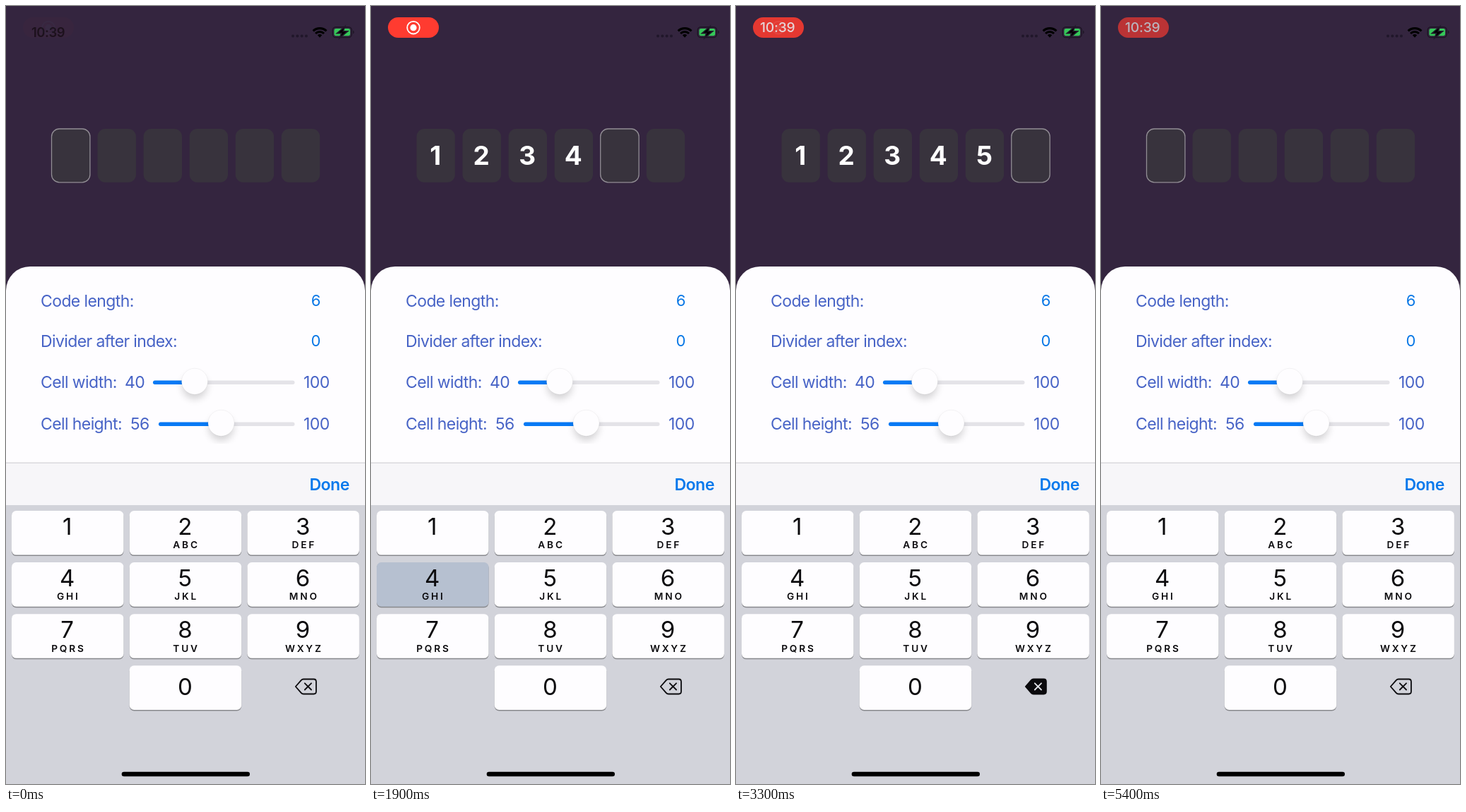
Animation of 508 by 1102 pixels, one loop 5.5 s. Source, as an HTML page:

```html
<!DOCTYPE html>
<html lang="en">
<head>
<meta charset="utf-8">
<title>Code entry</title>
<style>
html, body { margin: 0; width: 100%; height: 100%; overflow: hidden; background: #34253f; }
svg { display: block; width: 100%; height: 100%; }
text { font-family: Inter, "Liberation Sans", sans-serif; font-optical-sizing: none; }
.label { font-size: 23px; letter-spacing: -.6px; fill: #4763c6; }
.value { font-size: 22px; fill: #0a78e6; text-anchor: middle; }
.done { font-size: 23px; font-weight: 600; letter-spacing: -.5px; fill: #0879ec; }
.cell { fill: #38333d; }
.code { font-size: 37px; font-weight: 700; fill: #fff; text-anchor: middle; }
.num { font-size: 33px; fill: #0b0a0d; text-anchor: middle; }
.abc { font-size: 13.7px; font-weight: 600; letter-spacing: 2.8px; fill: #0b0a0d; text-anchor: middle; }
</style>
</head>
<body>
<svg id="stage" viewBox="0 0 508 1102">
  <defs>
    <filter id="soft" x="-60%" y="-60%" width="220%" height="240%"><feGaussianBlur stdDeviation="5.5"/></filter>
    <clipPath id="panelClip"><rect x="0" y="369" width="508" height="251"/></clipPath>
  </defs>
  <rect width="508" height="1102" fill="#34253f"/>

  <text id="clock" x="36" y="44" font-size="18.5" font-weight="600" letter-spacing="-.5">10:39</text>
  <g id="pill">
    <rect x="24" y="16" width="72" height="29" rx="14.5" fill="#ff3b30"/>
    <g id="record">
      <circle cx="60" cy="30.7" r="8.8" fill="none" stroke="#fff" stroke-width="1.8"/>
      <circle cx="60" cy="30.7" r="4.6" fill="#fff"/>
    </g>
    <text id="pillTime" x="34" y="37" font-size="19.3" font-weight="500" letter-spacing="-.2" fill="#fff">10:39</text>
  </g>

  <g fill="#20172a">
    <circle cx="406" cy="42.5" r="2"/><circle cx="412.3" cy="42.5" r="2"/>
    <circle cx="418.6" cy="42.5" r="2"/><circle cx="424.9" cy="42.5" r="2"/>
  </g>
  <g fill="none" stroke="#000" stroke-width="3.1">
    <path d="M434.6 35.4a13.6 13.6 0 0 1 18.8 0"/>
    <path d="M438 39a8.6 8.6 0 0 1 12 0"/>
    <path d="M440.8 41.2L444 44.8L447.2 41.2A4.6 4.6 0 0 0 440.8 41.2Z" fill="#000" stroke="none"/>
  </g>
  <rect x="462.2" y="29.7" width="27" height="14.8" rx="4.6" fill="none" stroke="#1d1524" stroke-width="1.4"/>
  <path d="M491 34.6v5a2.8 2.8 0 0 0 0-5z" fill="#1d1524"/>
  <rect x="464.4" y="31.9" width="22.6" height="10.4" rx="2.7" fill="#35c759"/>
  <path d="M479.6 29L468.2 38.6H474.6L472 45.4L483.6 35.8H477.2Z" fill="#000" stroke="#21182a" stroke-width="1.6"/>

  <g id="cells"></g>

  <path d="M0 647V403A34 34 0 0 1 34 369H474A34 34 0 0 1 508 403V647Z" fill="#fefdff"/>
  <text class="label" x="49" y="425.5">Code length:</text>
  <text class="label" x="49" y="482.5">Divider after index:</text>
  <text class="label" x="49" y="541">Cell width:</text>
  <text class="label" x="49" y="600">Cell height:</text>
  <text class="value" x="438.5" y="425">6</text>
  <text class="value" x="438.5" y="482">0</text>
  <g id="sliders"></g>

  <rect y="647" width="508" height="60" fill="#f7f6f9"/>
  <rect y="646.5" width="508" height="1.2" fill="#d3d2d6"/>
  <text class="done" x="429.5" y="685.7">Done</text>

  <rect y="707" width="508" height="395" fill="#d2d3da"/>
  <g id="keys"></g>
  <g stroke-linejoin="round" stroke-linecap="round" stroke-width="1.8">
    <path id="eraser" d="M409.8 964L417.6 955.1Q419 953.5 421 953.5H435.5Q438.9 953.5 438.9 956.9V971.1Q438.9 974.5 435.5 974.5H421Q419 974.5 417.6 972.9Z" stroke="#0b0a0d"/>
    <path id="cross" d="M422.8 959.3l9.2 9.2M432 959.3l-9.2 9.2" fill="none"/>
  </g>
  <rect x="163.7" y="1084.7" width="181.3" height="6.6" rx="3.3" fill="#000"/>
</svg>
<script>
const LOOP = 5500, STEP = 100;
const $ = id => document.getElementById(id);

// key, touch down, highlight end, digit shown
const taps = [
  [1, 1000, 1300, 1100],
  [2, 1300, 1500, 1400],
  [3, 1600, 1800, 1700],
  [4, 1800, 2000, 1900],
  [5, 2000, 2200, 2100],
  [6, 2400, 2600, 2500]
];
const erases = [3200, 3550, 3900, 4150, 4400, 4650];
const HOLD = 140;

// pill brightness over one pulse
const PULSE = 2200;
const pulse = [[0, 1], [300, .92], [800, .52], [1000, .66], [1100, .87], [1350, .96], [1600, .99], [1800, 1], [2200, 1]];

function add(parent, tag, attrs, text) {
  const el = document.createElementNS("http://www.w3.org/2000/svg", tag);
  for (const k in attrs) el.setAttribute(k, attrs[k]);
  if (text !== undefined) el.textContent = text;
  parent.append(el);
  return el;
}

function ramp(t, from, to) {
  return Math.min(1, Math.max(0, (t - from) / (to - from)));
}

function sample(table, t) {
  const i = table.findIndex(p => p[0] > t);
  if (i < 0) return table[table.length - 1][1];
  const [t0, a] = table[i - 1], [t1, b] = table[i];
  return a + (b - a) * ramp(t, t0, t1);
}

const cells = Array.from({ length: 6 }, (_, i) => {
  const x = 64.5 + i * 65.05;
  return {
    box: add($("cells"), "rect", { class: "cell", x, y: 174, width: 54.4, height: 75.8, rx: 11 }),
    digit: add($("cells"), "text", { class: "code", x: x + 26.7, y: 225 }, i + 1)
  };
});

function slider(value, textX, left, knob, y) {
  const g = add($("sliders"), "g", { "clip-path": "url(#panelClip)" });
  add(g, "text", { class: "label", x: textX, y: y + 8 }, value);
  add(g, "text", { class: "label", x: 421, y: y + 8 }, 100);
  add(g, "rect", { x: left, y: y - 2.5, width: 408.5 - left, height: 5.4, rx: 2.7, fill: "#e4e3e8" });
  add(g, "rect", { x: left, y: y - 2.5, width: knob - left, height: 5.4, rx: 2.7, fill: "#087af5" });
  add(g, "circle", { cx: knob, cy: y + 6, r: 17.5, fill: "#000", opacity: .17, filter: "url(#soft)" });
  add(g, "circle", { cx: knob, cy: y - 1.3, r: 18.5, fill: "#fefdff", stroke: "#000", "stroke-opacity": .06, "stroke-width": .8 });
}
slider(40, 168, 208, 267, 533);
slider(56, 176, 216, 304.5, 592);

const letters = ["", "ABC", "DEF", "GHI", "JKL", "MNO", "PQRS", "TUV", "WXYZ"];

function key(n, col, row) {
  const x = 8 + col * 166.7, y = 715 + row * 73.1, mid = x + 79.2;
  const size = { x, width: 158.5, height: 62.6, rx: 6.5 };
  add($("keys"), "rect", { ...size, y: y + 1.5, fill: "#88898d" });
  const cap = add($("keys"), "rect", { ...size, y, fill: "#fefdff" });
  add($("keys"), "text", { class: "num", x: mid - .5, y: y + (n ? 34 : 42) }, n);
  if (letters[n - 1]) add($("keys"), "text", { class: "abc", x: mid + 1.2, y: y + 53.3 }, letters[n - 1]);
  return cap;
}
const caps = [key(0, 1, 3)];
for (let n = 1; n < 10; n++) caps[n] = key(n, (n - 1) % 3, Math.floor((n - 1) / 3));

function draw(t) {
  const typed = taps.filter(p => t >= p[3]).length;
  const count = typed - erases.filter(e => t >= e).length;
  cells.forEach(({ box, digit }, i) => {
    const active = i === count;
    box.setAttribute("stroke", active ? "#918d94" : "none");
    box.setAttribute("stroke-width", 1.3);
    digit.setAttribute("visibility", i < count ? "visible" : "hidden");
  });

  caps.forEach((cap, n) => {
    const down = taps.some(([k, a, b]) => k === n && t >= a && t < b);
    cap.setAttribute("fill", down ? "#b6c0d0" : "#fefdff");
  });

  const erasing = erases.some(e => t >= e && t < e + HOLD);
  $("eraser").setAttribute("fill", erasing ? "#0b0a0d" : "none");
  $("cross").setAttribute("stroke", erasing ? "#e4e5ea" : "#0b0a0d");

  const swap = ramp(t, 3000, 3330);
  $("clock").setAttribute("opacity", .55 * (1 - ramp(t, 0, 300)));
  $("pill").setAttribute("opacity", (.02 + .98 * ramp(t, 0, 500)) * sample(pulse, t % PULSE));
  $("record").setAttribute("opacity", 1 - swap);
  $("pillTime").setAttribute("opacity", swap);
}

const start = performance.now();
function tick() {
  const t = (performance.now() - start) % LOOP;
  draw(Math.floor(t / STEP) * STEP);
  requestAnimationFrame(tick);
}
tick();
</script>
</body>
</html>
```
